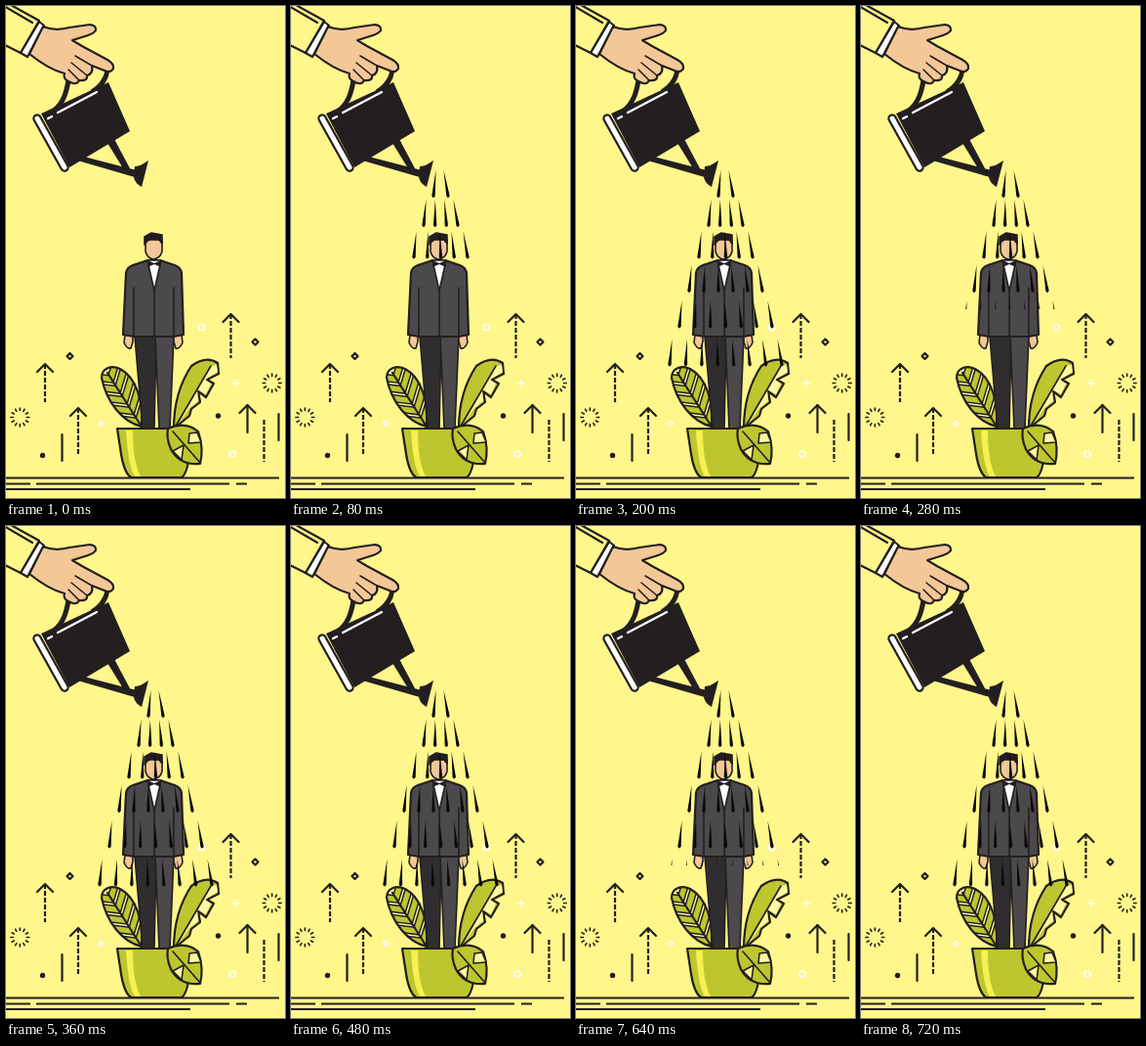
Animation, 286 px wide and 503 px high, one loop 800 ms. Source, as an HTML page:

```html
<!DOCTYPE html>
<html lang="en">
<head>
<meta charset="utf-8">
<title>Watering growth</title>
<style>
  html, body { margin: 0; width: 100%; height: 100%; overflow: hidden; background: #fff78b; }
  svg { position: absolute; left: 0; top: 0; width: 286px; height: 503px; }
  .ink { stroke: #231f20; stroke-width: 2.2; stroke-linejoin: round; stroke-linecap: round; }
  .thin { stroke-width: 1.6; }
  .line { fill: none; }
  .black { fill: #231f20; }
  .bg { fill: #fff78b; }
  .white { fill: #fff; }
  .skin { fill: #f4c797; }
  .suit { fill: #4b494b; }
  .green { fill: #bdc62f; }
  .cream { fill: #fff8a2; }
</style>
</head>
<body>
<svg viewBox="0 0 286 503">
  <defs>
    <path id="leaf" d="M139 430C119 425 103 405 98 380C98 370 108 367 117 371C134 380 141 405 139 430Z"/>
    <clipPath id="leafClip"><use href="#leaf"/></clipPath>
  </defs>

  <g id="signs"></g>

  <!-- ground -->
  <path class="ink line" style="stroke-linecap:butt" d="M0 482.5H280M0 488.5H25M31 488.5H229M236 488.5H247M0 494H189"/>

  <!-- can -->
  <path class="line" stroke="#231f20" stroke-width="5" d="M49 107C59 99 62 88 64 76M103 60C106 71 98 82 88 88"/>
  <path class="black" d="M36 110L105 78L127 128L65 165ZM72 152L134 168L132 175L70 157ZM104 140L111 136L127 166L120 166ZM132 164C137 164 141 161 146 158L139 185Q132 181 131 175Z"/>
  <path d="M32 115L60 165" stroke="#231f20" stroke-width="9.5" stroke-linecap="round"/>
  <path d="M32 115L60 165" stroke="#fff" stroke-width="5" stroke-linecap="round"/>
  <path d="M43 115L47 113M53 109L93 88" stroke="#fff" stroke-width="2.3" stroke-linecap="round"/>

  <!-- arm -->
  <path class="ink bg" d="M-5 -6L5 -1L34 15L15 48L-5 38Z"/>
  <path class="ink line" d="M-4 -1L27 17"/>
  <path class="ink white" d="M34 16L39 20L22 52L15 48Z"/>
  <path class="ink skin" d="M38 21Q50 26 65 22L86 19Q93 20 92 25Q90 28 84 30L68 35L78 41L104 55Q111 59 110 64Q107 69 101 66L88 61Q90 69 83 71Q84 77 75 76Q72 82 64 77Q58 74 60 69Q44 65 24 49Z"/>
  <path class="ink line thin" d="M71 51L88 61M67 58L83 71M64 65L75 76"/>

  <!-- back leaves -->
  <use href="#leaf" class="cream"/>
  <g clip-path="url(#leafClip)"><g id="stripes" transform="translate(139 430) rotate(-33)"></g></g>
  <use href="#leaf" class="ink line"/>
  <path class="ink line" d="M139 430L104 375"/>
  <path class="ink green" d="M172 432Q172 395 190 368Q205 357 217 365L218 376L206 382L213 386L205 400L197 394L199 405L190 412L188 419Z"/>
  <path class="cream" d="M177 427L210 368L216 367L217 374L204 382L210 386L205 397L196 392L197 404L188 411Z"/>
  <path class="ink line thin" d="M173 431L210 368"/>

  <!-- legs, hands, jacket -->
  <path class="ink thin" fill="#302d30" d="M132 338H154L152 432H140Z"/>
  <path class="ink thin suit" d="M153 338H172L168 432H157Z"/>
  <path class="ink thin skin" d="M122 336L121 344Q124 351 128 350L130 343V336ZM180 336L181 344Q178 351 174 350L172 343V336Z"/>
  <path class="ink suit" d="M145 260L130 265Q124 267 123 273L120 336L131 338H172L182 336L180 273Q179 267 173 265L158 260Z"/>
  <path class="ink line thin" d="M131 288V338M172 288V338M152 290V338"/>
  <path class="ink thin white" d="M145 260L152 291L159 260Z"/>
  <path class="black" d="M145 260L152 263L159 260V267L152 264L145 267Z"/>

  <!-- head -->
  <path class="ink thin skin" d="M143 239V251Q145 258 151 259Q158 258 160 251V239Z"/>
  <path class="ink thin black" d="M142 244V236L149 232L160 234V243L157 239L148 238L144 241Z"/>

  <!-- pot -->
  <path class="ink green" d="M114 432H190L188 458Q186 478 180 482H128Q121 477 118 458Z"/>
  <path fill="#f6f052" d="M123 434H130Q130 466 138 481H132Q125 470 123 434Z"/>
  <path class="ink green" d="M166 432Q184 424 197 435Q203 452 199 468Q178 470 169 453Q164 442 166 432Z"/>
  <path class="ink thin cream" d="M187 447L188 437L196 436L200 446ZM182 449L171 455L180 464Z"/>
  <path class="ink line thin" d="M171 435L199 467"/>
</svg>

<svg id="water" viewBox="0 0 286 503"></svg>

<script>
const $ = id => document.getElementById(id);

function add(parent, d, attrs = {}) {
  const el = document.createElementNS('http://www.w3.org/2000/svg', 'path');
  el.setAttribute('d', d);
  for (const k in attrs) el.setAttribute(k, attrs[k]);
  parent.append(el);
}

const signs = $('signs');
const ink = { class: 'ink line' };
const dashed = { class: 'ink line', 'stroke-dasharray': '5 2', style: 'stroke-linecap:butt' };
const ring = (x, y, r) => `M${x - r} ${y}a${r} ${r} 0 1 0 ${2 * r} 0a${r} ${r} 0 1 0 ${-2 * r} 0Z`;
const diamond = (x, y, r) => `M${x} ${y - r}l${r} ${r}l${-r} ${r}l${-r} ${-r}Z`;

function arrow(x, top, bottom, style) {
  add(signs, `M${x - 8} ${top + 8}l8 -8l8 8`, ink);
  add(signs, `M${x} ${top}V${bottom}`, style);
}

function burst(x, y) {
  let d = '';
  for (let i = 0; i < 12; i++) {
    const c = Math.cos(i * Math.PI / 6), s = Math.sin(i * Math.PI / 6);
    d += `M${x + 7 * c} ${y + 7 * s}L${x + 9.5 * c} ${y + 9.5 * s}`;
  }
  add(signs, d, { class: 'ink line thin' });
}

arrow(40, 366, 405, dashed);
arrow(74, 411, 459, dashed);
arrow(230.5, 315, 360, dashed);
arrow(247.5, 408, 436, ink);
add(signs, 'M264.5 423V466', dashed);
add(signs, 'M57.5 438V465M279.5 417V444', ink);
burst(14.3, 420.5);
burst(272.7, 385.5);
add(signs, diamond(65.5, 358, 3) + diamond(255.5, 343.5, 3), ink);
add(signs, ring(37.5, 459.5, 2.7) + ring(217.5, 419, 2.7), { class: 'black' });
add(signs, ring(200.5, 328.5, 3) + ring(232, 458, 3) + diamond(97, 427, 2.5) + 'M232 386h8M236 382v8',
  { fill: 'none', stroke: '#fff', 'stroke-width': 1.7 });

// chevrons up the leaf's vein: a dark band with a green core
for (let y = -6; y > -70; y -= 13) {
  for (const [stroke, width] of [['#231f20', 8.5], ['#bdc62f', 5.5]]) {
    add($('stripes'), `M-26 ${y - 22}L0 ${y}L26 ${y - 22}`, { fill: 'none', stroke, 'stroke-width': width });
  }
}

// drops fan out row by row below the spout
const water = $('water');
for (let row = 0; row < 6; row++) {
  const count = 2 + Math.ceil(row * 1.2);
  const y = 168 + 29 * row + 1.1 * row * row;
  for (let i = 0; i < count; i++) {
    const side = 2 * i / (count - 1) - 1;
    const x = 152.5 + side * (4 + 10 * row);
    const tip = x + 1 + 3.5 * side;
    add(water, `M${x} ${y}L${tip - 1.7} ${y + 26}Q${tip} ${y + 30} ${tip + 1.7} ${y + 26}Z`, { fill: '#0b090a' });
  }
}

// each pour uncovers the drops downwards in ticks, then holds
const LOOP = 800, TICK = 40, FULL = 425;
const pours = [
  { start: 0, end: 200, from: 160 },
  { start: 280, end: 360, from: 310 },
  { start: 440, end: 480, from: 350 },
  { start: 560, end: 720, from: 269 }
];
const frame = (t, y, easing) => ({ offset: t / LOOP, clipPath: `inset(0px 0px ${503 - y}px 0px)`, easing });
const frames = pours.flatMap(({ start, end, from }) => [
  frame(start, from, `steps(${(end - start) / TICK})`),
  frame(end, FULL, 'step-end')
]);
water.animate([...frames, frame(LOOP, FULL, 'linear')], { duration: LOOP, iterations: Infinity });
</script>
</body>
</html>
```
